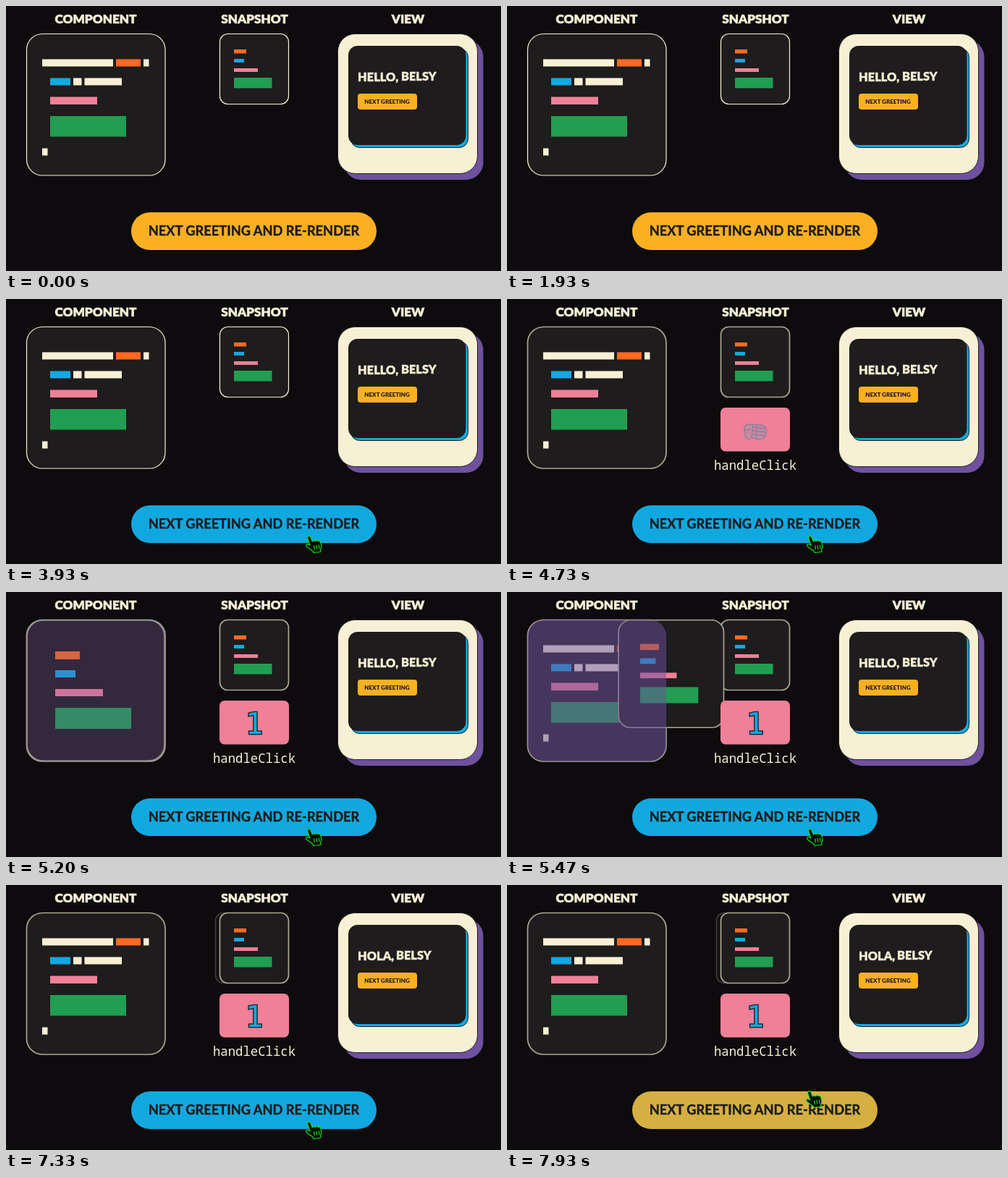
An HTML page that plays this animation: 684x366 px, repeating every 8 s.

```html
<!DOCTYPE html>
<html lang="en">
<head>
<meta charset="utf-8">
<title>Render cycle</title>
<style>
  html, body { margin: 0; width: 100%; height: 100%; overflow: hidden; background: #0d0b0d; }
  svg { display: block; width: 100vw; height: 100vh; --line: #f7f0d5; --weight: 1.2; }
  text { font-family: Lato, sans-serif; font-weight: 900; }
  .heading { fill: #f7f0d5; stroke: #f7f0d5; stroke-width: .6; font-size: 17.1px; text-anchor: middle; }
  .greeting { fill: #f7f0d5; stroke: #f7f0d5; stroke-width: .4; font-size: 16.4px; }
  .card { fill: #1e1c1c; stroke: var(--line); stroke-width: var(--weight); vector-effect: non-scaling-stroke; }
  .label { font-size: 8px; text-anchor: middle; fill: #1e1c1c; }
  .action { font-size: 18.25px; font-weight: 700; text-anchor: middle; fill: #1e1c1c; stroke: #1e1c1c; stroke-width: .4; }
  .cream { fill: #f7f0d5; }
  .orange { fill: #ff6a24; }
  .blue { fill: #12a8e0; }
  .pink { fill: #f07f98; }
  .green { fill: #219e51; }
  .purple { fill: #6f519f; }
  .ink { stroke: #1e1c1c; }
  .mono { font-family: "Noto Sans Mono", monospace; font-weight: 300; font-size: 17.3px; text-anchor: middle; }
  .digit { font-family: "DejaVu Sans Mono", monospace; font-weight: 400; font-size: 41px; text-anchor: middle;
           stroke-width: 2.6; paint-order: stroke; }
</style>
</head>
<body>
<svg viewBox="0 0 684 366" preserveAspectRatio="none">
  <defs>
    <g id="snapshot">
      <rect class="card" x=".5" y=".5" width="95" height="97" rx="11"/>
      <rect class="orange" x="20" y="22" width="17" height="5.5"/>
      <rect class="blue" x="20" y="35" width="14" height="5"/>
      <rect class="pink" x="20" y="48" width="33" height="5"/>
      <rect class="green" x="20" y="61" width="52.5" height="14.5"/>
    </g>
  </defs>

  <text class="heading" x="124" y="24">COMPONENT</text>
  <text class="heading" x="343.5" y="24">SNAPSHOT</text>
  <text class="heading" x="555.5" y="24">VIEW</text>

  <rect class="card" x="28.5" y="38.5" width="191.5" height="195.5" rx="22"/>
  <g id="code"></g>

  <use id="previous" href="#snapshot"/>
  <use id="next" href="#snapshot"/>
  <rect id="pulse" class="purple" x="28.5" y="38.5" width="191.5" height="195.5" rx="22"/>

  <g id="handler">
    <rect class="pink" x="295" y="150" width="96" height="60.5" rx="7"/>
    <g id="fist" fill="#c58ba2" stroke="#8580a0" stroke-width="1.3" stroke-linejoin="round">
      <path d="M328 181Q327 174 334 173L349 174Q356 174 358 179Q360 183 357 189Q355 194 348 194L338 192L333 194L329 190Z"/>
      <path d="M340 177L357 179M339 182L358 184M339 187L357 189M340 173L338 191M328 181L336 180M345 174L344 193" fill="none"/>
    </g>
    <text id="one" class="digit blue ink" x="343" y="196">1</text>
    <text class="mono cream" x="343" y="236">handleClick</text>
  </g>

  <rect class="purple" x="466.5" y="46.5" width="193" height="193.5" rx="24"/>
  <rect class="cream ink" x="458.5" y="38.5" width="193" height="193" rx="24"/>
  <rect class="blue ink" x="476.5" y="58.5" width="162" height="137" rx="12"/>
  <rect class="ink" fill="#1e1c1c" x="473.5" y="55.5" width="161.5" height="136" rx="12"/>
  <text id="hello" class="greeting" x="486" y="104"></text>
  <text id="name" class="greeting" y="103">BELSY</text>
  <rect fill="#fbb022" x="486" y="121" width="82" height="22" rx="4"/>
  <text class="label" x="526.5" y="135">NEXT GREETING</text>

  <rect id="packet" class="green" y="99" width="52.5" height="14.5"/>

  <rect id="button" x="173" y="285" width="339" height="52" rx="26"/>
  <text class="action" x="342.5" y="317.3">NEXT GREETING AND RE-RENDER</text>

  <g id="cursor" fill="#050805" stroke="#16e316" stroke-width="1.2" stroke-linejoin="round">
    <path d="M-2.5 2Q-2.5 -.5 0 -.5Q1.5 -.5 2.2 1.5L4.3 7Q6 4.8 8 6.5Q10 4.6 12 6.3Q14.8 5.3 15.8 8L17 14.5L15.5 18L16 21L6 22.5L5 20L-3 14.5Q-5.5 12 -3.5 10.5Q-1.5 9.8 1 12Z"/>
    <path d="M6.5 12.5L7.5 18M10 12L10.8 17.5M13.3 11.5L14 17" fill="none"/>
  </g>
</svg>
<script>
const LOOP = 8000;
const $ = id => document.getElementById(id);
const set = (id, attrs) => { for (const key in attrs) $(id).setAttribute(key, attrs[key]); };
const clamp = v => Math.min(1, Math.max(0, v));
const span = (t, start, end) => clamp((t - start) / (end - start));
const ease = p => p * p * (3 - 2 * p);
const mix = (a, b, p) => a + (b - a) * p;

// Component bars: class, x, y, width, height
$('code').innerHTML = [
  ['cream', 50, 73.5, 98, 10], ['orange', 152, 73.5, 34, 10], ['cream', 190, 73.5, 7.5, 10],
  ['blue', 61, 99.5, 28, 10], ['cream', 93, 99.5, 11.5, 10], ['cream', 108.5, 99.5, 51.5, 10],
  ['pink', 61, 125.5, 65, 10.5], ['green', 61, 152, 105, 28.5], ['cream', 50, 196.5, 7.5, 10]
].map(([c, x, y, w, h]) => `<rect class="${c}" x="${x}" y="${y}" width="${w}" height="${h}"/>`).join('');

// Cursor fingertip: time, x, y
const path = [[2850, 438, 370], [3200, 427, 307], [3420, 423, 303], [3900, 419, 328], [7400, 419, 328], [7850, 418, 288], [8000, 418, 283]];

function cursorAt(t) {
  const i = path.findIndex(p => p[0] > t);
  if (i < 1) return path[0];
  const [a, b] = [path[i - 1], path[i]];
  const p = ease(span(t, a[0], b[0]));
  return [t, mix(a[1], b[1], p), mix(a[2], b[2], p)];
}

function draw(t) {
  const clicked = t >= 4100;
  const svg = document.querySelector('svg');
  svg.style.setProperty('--line', clicked ? '#a9a692' : '#f7f0d5');
  svg.style.setProperty('--weight', clicked ? 1.7 : 1.2);

  const [, x, y] = cursorAt(t);
  set('cursor', { transform: `translate(${x} ${y})` });

  const hover = span(t, 3050, 3232) - span(t, 7780, 7960);
  const rgb = [[251, 17], [176, 168], [34, 224]].map(([a, b]) => Math.round(mix(a, b, hover)));
  set('button', { fill: `rgb(${rgb})` });

  set('handler', { opacity: span(t, 4100, 4300) });
  const counted = span(t, 4900, 5100);
  set('fist', { opacity: 0.9 * (1 - counted) });
  set('one', { opacity: counted });

  set('pulse', { opacity: 0.5 * (span(t, 5100, 5300) - span(t, 5750, 6000)) });
  const flight = ease(span(t, 5200, 5765));
  set('next', {
    transform: `translate(${mix(28, 295, flight)} 38) scale(${mix(2, 1, flight)})`,
    opacity: t >= 5200 ? 1 : 0
  });
  const aside = ease(span(t, 5765, 6000));
  set('previous', { transform: `translate(${295 - 6 * aside} 38)`, opacity: 1 - 0.7 * aside });

  const sent = span(t, 6080, 6680);
  set('packet', { x: mix(315, 486, ease(sent)), opacity: sent > 0 && sent < 1 ? 1 - 0.6 * sent : 0 });

  const updated = t >= 6680;
  $('hello').textContent = updated ? 'HOLA,' : 'HELLO,';
  set('name', { x: updated ? 539 : 546 });
}

function tick() {
  draw(performance.now() % LOOP);
  requestAnimationFrame(tick);
}
tick();
</script>
</body>
</html>
```
